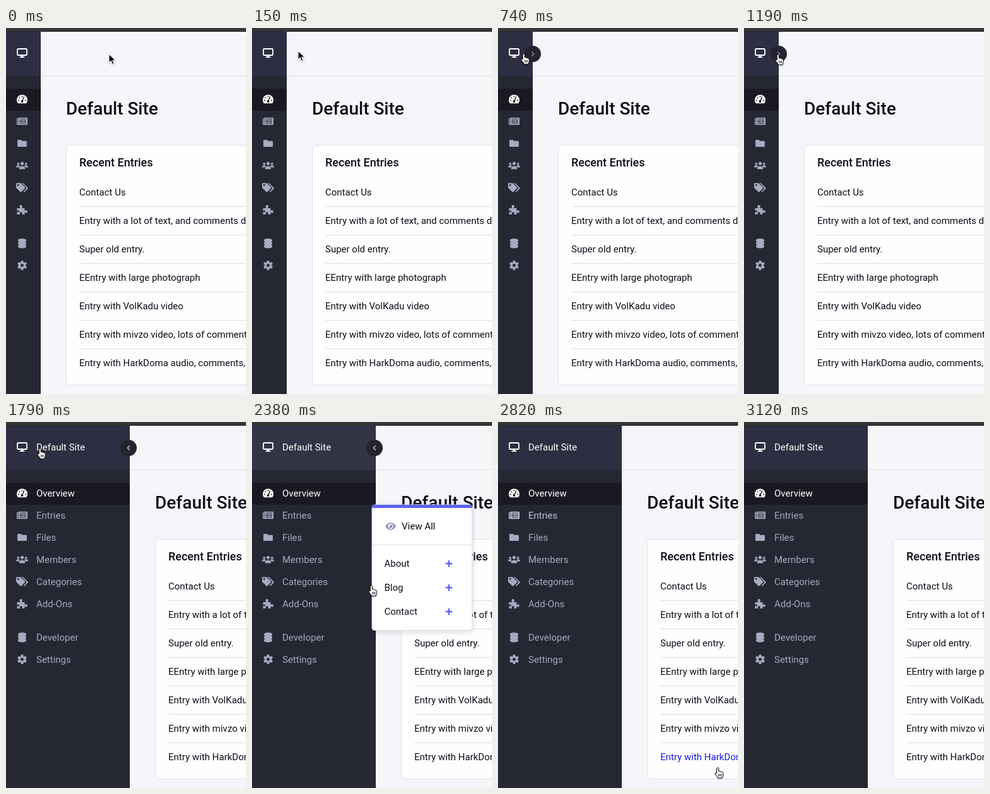
Animation of 380x579 px, one loop 3.56 s. Source, as an HTML page:

```html
<!DOCTYPE html>
<html lang="en">
<head>
<meta charset="utf-8">
<title>Collapsible sidebar</title>
<style>
html, body { margin: 0; width: 100%; height: 100%; overflow: hidden; background: #f5f5fa; }
svg { display: block; }
text { font: 400 15px Roboto, sans-serif; fill: #0d0d19; white-space: pre; }
.title { font-size: 28px; font-weight: 500; }
.head { font-size: 18px; font-weight: 500; }
.hover { fill: #1c1cd8; }
#nav text { fill: #a9a9c1; }
#nav .on text { fill: #fff; }
#nav .ico { fill: #a9a9c1; color: #252733; }
#nav .on .ico { fill: #fff; color: #1a1923; }
#nav .warm text, #nav .warm .ico { fill: #c3c3d6; }
.cut { stroke: currentColor; fill: none; }
</style>
</head>
<body>
<svg width="380" height="579" viewBox="0 0 380 579">
  <defs>
    <filter id="soft" x="-20%" y="-20%" width="140%" height="140%">
      <feDropShadow dx="0" dy="2" stdDeviation="4" flood-color="#22223a" flood-opacity=".16"/>
    </filter>
    <filter id="drop" x="-50%" y="-50%" width="200%" height="200%">
      <feDropShadow dx="0" dy="1" stdDeviation=".8" flood-opacity=".3"/>
    </filter>
  </defs>

  <rect width="380" height="579" fill="#f5f5fa"/>
  <path d="M0 75.5H380" stroke="#dfdfe9"/>

  <g id="page">
    <text class="title" x="95" y="137">Default Site</text>
    <rect x="95.5" y="185.5" width="400" height="379" rx="5" fill="#fefefe" stroke="#dfdfec"/>
    <text class="head" x="116" y="219">Recent Entries</text>
    <g id="rows"></g>
  </g>

  <g id="nav">
    <rect id="side" y="6" height="573" fill="#252733"/>
    <rect id="top" y="6" height="70" fill="#2e2e42"/>
    <rect id="active" y="96" height="35" fill="#1a1923"/>
    <g id="items"></g>
  </g>
  <rect width="380" height="6" fill="#373739"/>
  <path d="M0 5.5H380" stroke="#29292c"/>

  <g id="toggle">
    <circle r="13" fill="#23242f"/>
    <path id="chev" fill="none" stroke="#c9c9d8" stroke-width="1.5" stroke-linecap="round" stroke-linejoin="round"/>
  </g>

  <g id="popup">
    <rect x="190" y="131" width="158.500" height="198.500" rx="4" fill="#fff" stroke="#dcdce8" filter="url(#soft)"/>
    <path d="M189.500 136V134a3 3 0 0 1 3-3H346a3 3 0 0 1 3 3V136Z" fill="#5d63f1"/>
    <path d="M190 194.500H348" stroke="#dfdfec"/>
    <path d="M211 165C215 157.300 224 157.300 228 165C224 172.700 215 172.700 211 165Z" fill="#8f90b8"/>
    <circle cx="219.500" cy="165" r="4.200" fill="#fff"/>
    <circle cx="219.500" cy="165" r="2.800" fill="#8f90b8"/>
    <circle cx="218.200" cy="163.700" r="1.300" fill="#fff"/>
    <text x="237" y="170">View All</text>
    <g id="links"></g>
  </g>

  <g id="arrow" filter="url(#drop)">
    <path d="M0 0V14.200L3.300 11.100L5.600 16.400L8.100 15.300L5.800 10.200H10.300Z" fill="#000" stroke="#fff" stroke-width="1.100" stroke-linejoin="round"/>
  </g>
  <g id="hand" filter="url(#drop)">
    <path d="M4.700 .8C5.800 .8 6.300 1.600 6.300 2.600V6.700C7 5.900 8.600 6.100 8.800 7.300C9.500 6.600 10.900 6.900 11.100 8.100C12 7.600 13.300 8.200 13.300 9.500V12.300C13.300 14.500 12 15.400 12 17.200H5.400C5 15.300 2.300 12.900 1.100 11C.2 9.500 1.600 8.300 2.800 9.300L3.200 9.700V2.600C3.200 1.600 3.700 .8 4.700 .8Z" fill="#fff" stroke="#000" stroke-linejoin="round"/>
    <path d="M6.600 10.800V14.500M8.600 10.800V14.500M10.600 10.800V14.500" stroke="#000" stroke-width=".9"/>
  </g>
</svg>
<script>
const LOOP = 3560;
const $ = id => document.getElementById(id);

// Icons are drawn around their own centre.
const gear = [0, 60, 120].map(a =>
  `<rect x="-2" y="-7.600" width="4" height="15.200" rx="1" transform="rotate(${a})"/>`).join('');
const disc = y => `<path d="M-6.500 ${y}a6.500 2.200 0 0 1 13 0v1.700a6.500 2.200 0 0 1-13 0Z"/>`;
const person = (x, y, s) =>
  `<g transform="translate(${x} ${y}) scale(${s})"><circle r="3" cy="-3.400"/><path d="M-5 6V3.500A3.500 3.500 0 0 1-1.500 .5H1.500A3.500 3.500 0 0 1 5 3.500V6Z"/></g>`;

const icons = {
  screen: '<rect x="-7.500" y="-6.500" width="15" height="10" rx="1.200" fill="none" stroke="#fff" stroke-width="1.800"/><path d="M-1.500 3.500H1.500L2 6H4V7.500H-4V6H-2Z"/>',
  gauge: '<path d="M-7 6.300A8.500 8.500 0 1 1 7 6.300Q6.600 6.800 6 6.800H-6Q-6.600 6.800-7 6.300Z"/><path class="cut" stroke-width="1.400" stroke-linecap="round" d="M.4 2.500L3-3.400"/><g fill="currentColor"><circle cy="3.500" r="1.900"/><circle cx="-5.500" cy="2" r="1"/><circle cx="-4" cy="-2.300" r="1"/><circle cy="-4.300" r="1"/><circle cx="5.500" cy="2" r="1"/></g>',
  news: '<path d="M-5.500-5.800H7.500a1 1 0 0 1 1 1V4.800a1 1 0 0 1-1 1H-7a1.500 1.500 0 0 1-1.500-1.500V-4.500H-6.500Z"/><path class="cut" d="M-6.500-4V4M-4-3.500H6.500M2 -1H6.500M2 1H6.500M-4 3.300H6.500"/><path class="cut" d="M-3.500-1H.5V1H-3.500Z"/>',
  folder: '<path d="M-7.500-4.300a1.300 1.300 0 0 1 1.300-1.300H-1.700L.2-3.700H6.200a1.300 1.300 0 0 1 1.300 1.300V4.300a1.300 1.300 0 0 1-1.300 1.300H-6.200a1.300 1.300 0 0 1-1.300-1.300Z"/>',
  users: person(-6.2, -.6, .62) + person(6.2, -.6, .62) +
    '<g stroke="currentColor" stroke-width=".8">' + person(0, .3, 1) + '</g>',
  tags: '<path d="M-9.500-6a1.300 1.300 0 0 1 1.300-1.300H-2.300L4.400-.7a1.500 1.500 0 0 1 0 2L-1 6.800a1.500 1.500 0 0 1-2 0L-9.500 .3Z"/><circle cx="-6.200" cy="-4" r="1.400" fill="currentColor"/><path d="M-.6-7.300H1.400L8.800 0a1.500 1.500 0 0 1 0 2L3.500 7.300L2.300 6.300L6.200 2Q7 .8 6 -.5Z"/>',
  puzzle: '<path d="M-8-2.500H-3.600C-2.800-2.500-3.300-3.700-3.800-4.500C-4.800-6.200-3.400-7.600-1.800-7.600S1.200-6.200 .2-4.500C-.3-3.700-.8-2.500 0-2.500H4V1C4 2 5 1.600 5.600 1.100C7 0 8.400 1.200 8.400 2.900S7 5.800 5.600 4.700C5 4.200 4 3.800 4 4.800V7.500H.3C-.6 7.500-.3 6.700 .1 6C.8 4.800-.4 3.800-1.800 3.800S-4.400 4.800-3.700 6C-3.300 6.700-3 7.500-3.900 7.500H-8V3.900C-8 3-7 3.400-6.400 3.800C-5.200 4.500-4.600 3.500-4.600 2.500S-5.200 .5-6.400 1.200C-7 1.600-8 2-8 1Z"/>',
  stack: disc(-5.2) + disc(-.6) + disc(4),
  gear: `<circle r="5.400"/>${gear}<circle r="2.400" fill="currentColor"/>`
};

const menu = [
  ['screen', 'Default Site', 40], ['gauge', 'Overview', 113], ['news', 'Entries', 148],
  ['folder', 'Files', 183], ['users', 'Members', 218], ['tags', 'Categories', 253],
  ['puzzle', 'Add-Ons', 288], ['stack', 'Developer', 341], ['gear', 'Settings', 376]
];
$('items').innerHTML = menu.map(([icon, label, y], i) =>
  `<g id="${icon}" class="${i < 2 ? 'on' : ''}"><g class="ico" transform="translate(25.500 ${y - .5})">${icons[icon]}</g><text x="48" y="${y + 5}">${label}</text></g>`).join('');

const entries = [
  'Contact Us', 'Entry with a lot of text, and comments disabled', 'Super old entry.',
  'EEntry with large photograph', 'Entry with VolKadu video',
  'Entry with mivzo video, lots of comments', 'Entry with HarkDoma audio, comments, and more'
];
$('rows').innerHTML = entries.map((s, i) =>
  `<text x="116" y="${265 + i * 45}">${s}</text>` +
  (i < 6 ? `<path d="M116 ${282.5 + i * 45}H480" stroke="#dddde9"/>` : '')).join('');

$('links').innerHTML = ['About', 'Blog', 'Contact'].map((s, i) => {
  const y = 224 + i * 38;
  return `<text x="209.500" y="${y + 5}">${s}</text><path d="M306.500 ${y}h10.500m-5.250-5.250v10.500" stroke="#5d63f1" stroke-width="2.300"/>`;
}).join('');

// time, pointer, x, y
const moves = [
  [0, 'arrow', 163, 41], [150, 'arrow', 73, 36], [300, 'arrow', 67, 36], [450, 'arrow', 58, 38],
  [600, 'hand', 48, 39], [740, 'hand', 36, 40], [890, 'hand', 46, 41], [1040, 'hand', 54, 41],
  [1190, 'hand', 49, 41], [2380, 'hand', 184, 258], [2530, 'hand', 300, 480],
  [2670, 'hand', 330, 520], [2820, 'hand', 343, 546], [2970, 'hand', 350, 565], [3120, '', 0, 0]
];

const labels = document.querySelectorAll('#items text');
const rows = document.querySelectorAll('#rows text');
const show = (el, on) => { el.style.display = on ? '' : 'none'; };
const place = (el, x, y) => el.setAttribute('transform', `translate(${x} ${y})`);

function draw(t) {
  const during = (a, b = LOOP) => t >= a && t < b;
  const open = during(1790);
  const width = open ? 196 : 55;

  for (const id of ['side', 'top', 'active']) $(id).setAttribute('width', width);
  labels.forEach(el => show(el, open));
  place($('page'), width - 55, 0);
  $('top').setAttribute('fill', during(2380, 2530) ? '#343447' : '#2e2e42');
  $('news').classList.toggle('warm', during(2530, 2970));

  show($('toggle'), during(600, 2530));
  place($('toggle'), open ? 194 : 55, 41);
  $('chev').setAttribute('d', open ? 'M1.300-3L-1.700 0L1.300 3' : 'M-1.300-3L1.700 0L-1.300 3');
  $('chev').setAttribute('opacity', open ? 1 : .6);

  show($('popup'), during(2380, 2670));
  rows[5].classList.toggle('hover', during(2530, 2670));
  rows[6].classList.toggle('hover', during(2670, 3120));

  const [, kind, x, y] = moves.findLast(m => m[0] <= t);
  for (const id of ['arrow', 'hand']) {
    show($(id), id === kind);
    place($(id), x, y);
  }
}

const start = performance.now();
function tick() {
  draw((performance.now() - start) % LOOP);
  requestAnimationFrame(tick);
}
tick();
</script>
</body>
</html>
```
